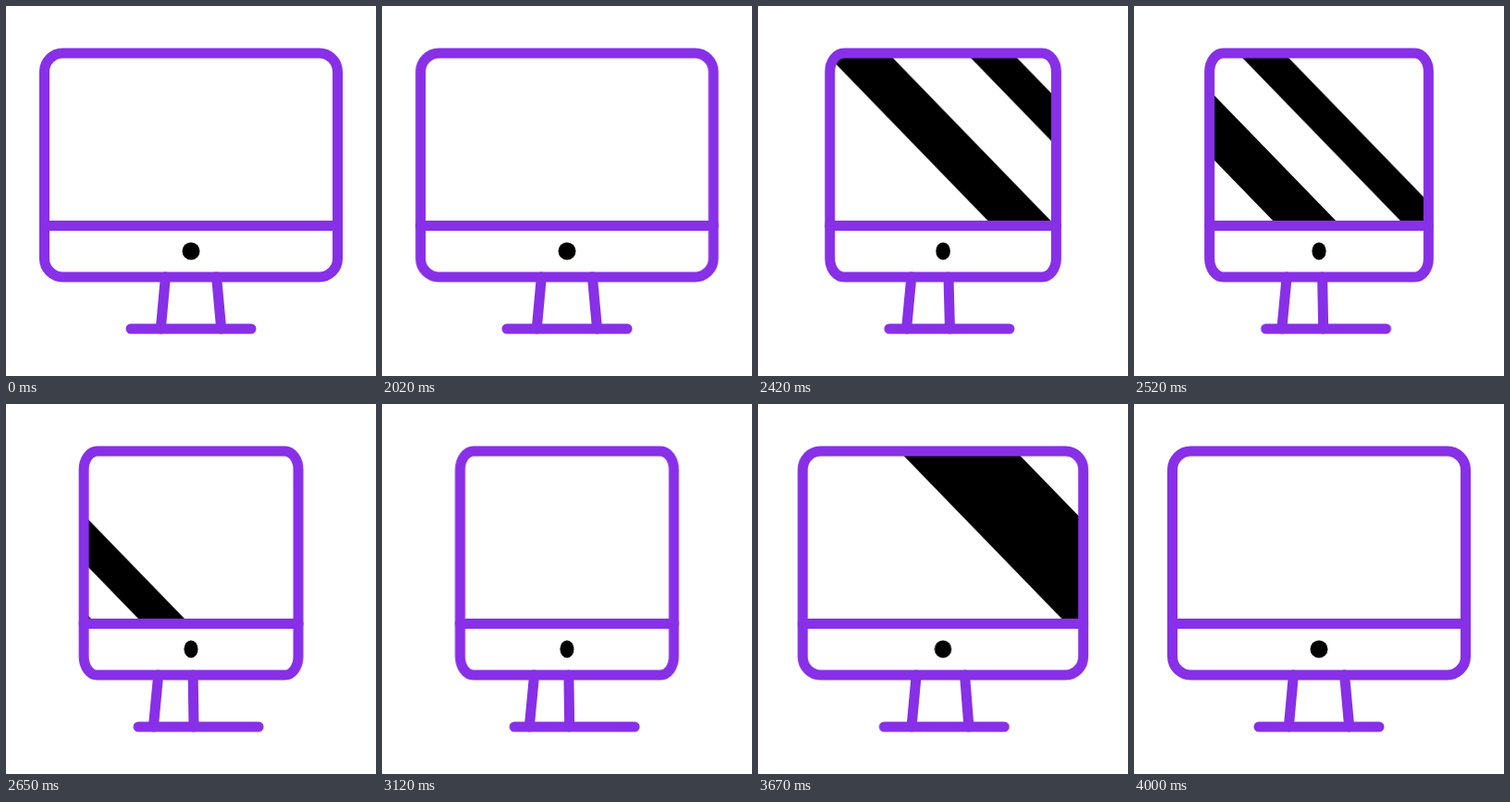
An HTML page for the animation above (4020 ms loop, 400 by 400 pixels).

```html
<!DOCTYPE html>
<html lang="en">
<head>
<meta charset="utf-8">
<title>Turning monitor</title>
<style>
  html, body { margin: 0; width: 100%; height: 100%; overflow: hidden; background: #fff; }
  svg { display: block; width: 400px; height: 400px; }

  .line { fill: none; stroke: #8730e7; stroke-width: 11; stroke-linecap: round; vector-effect: non-scaling-stroke; }

  /* The turn takes 750 ms, holds for 500 ms, then turns back */
  .turn {
    transform-origin: 200px 200px;
    animation: 4020ms cubic-bezier(.29, 0, .256, 1) infinite;
  }
  .body { animation-name: narrow; }
  .dot { animation-name: squeeze; }
  .base { animation-name: shift; }
  .left { animation-name: left-leg; }
  .right { animation-name: right-leg; }

  @keyframes narrow {
    0%, 49.63%, 99.38%, 100% { transform: none; }
    68.28%, 80.72% { transform: scaleX(.7287); }
  }
  @keyframes squeeze {
    0%, 49.63%, 99.38%, 100% { transform: none; }
    68.28%, 80.72% { transform: scaleX(.79); }
  }
  @keyframes shift {
    0%, 49.63%, 99.38%, 100% { transform: none; }
    68.28%, 80.72% { transform: translateX(8.1px); }
  }
  @keyframes left-leg {
    0%, 49.63%, 99.38%, 100% { d: path("M172.4 293 L167.3 349"); }
    68.28%, 80.72% { d: path("M164.6 293 L159.3 349"); }
  }
  @keyframes right-leg {
    0%, 49.63%, 99.38%, 100% { d: path("M227.6 293 L232.7 349"); }
    68.28%, 80.72% { d: path("M201.9 293 L202.7 349"); }
  }

  /* Reflections: two sweep left on the way out, a wide one sweeps right on the way back */
  .glare { animation: 4020ms cubic-bezier(.25, .1, .75, .9) infinite; }
  .first { animation-name: sweep-first; }
  .second { animation-name: sweep-second; }
  .wide { animation-name: sweep-back; }

  @keyframes sweep-first {
    0%, 49.63% { transform: translateX(620px); }
    74.5%, 100% { transform: translateX(-201px); }
  }
  @keyframes sweep-second {
    0%, 49.63% { transform: translateX(813px); }
    74.5%, 100% { transform: translateX(-129px); }
  }
  @keyframes sweep-back {
    0%, 74.5% { transform: translateX(-176px); }
    99.38%, 100% { transform: translateX(625px); }
  }
</style>
</head>
<body>
<svg viewBox="0 0 400 400">
  <clipPath id="screen">
    <rect class="turn body" x="41.5" y="51" width="317" height="242" rx="20"/>
  </clipPath>

  <g clip-path="url(#screen)">
    <path class="glare first" d="M-29 237 l-194 -200 h68 l194 200z"/>
    <path class="glare second" d="M-20 237 l-194 -200 h50 l194 200z"/>
    <path class="glare wide" d="M-58 237 l-194 -200 h126 l194 200z"/>
  </g>

  <path class="line turn left" d="M172.4 293 L167.3 349"/>
  <path class="line turn right" d="M227.6 293 L232.7 349"/>
  <path class="line turn base" d="M135 349 H265"/>
  <rect class="line turn body" x="41.5" y="51" width="317" height="242" rx="20"/>
  <path class="line turn body" d="M41.5 237.5 H358.5"/>
  <circle class="turn dot" cx="200" cy="265" r="9.5"/>
</svg>
</body>
</html>
```
